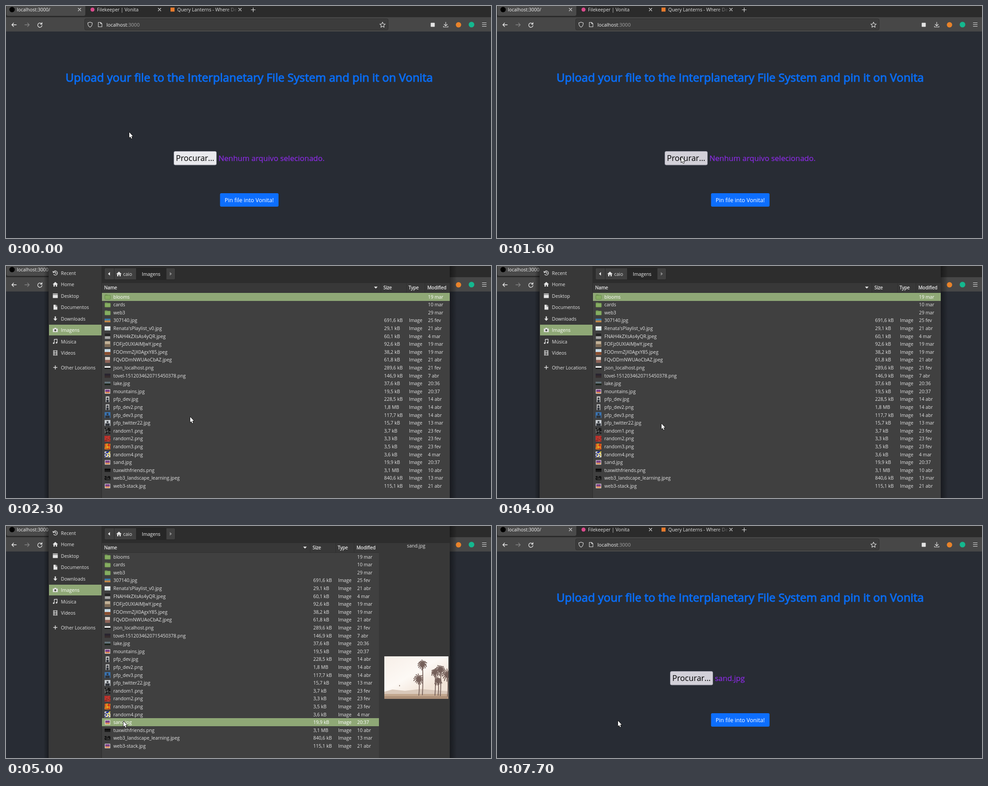
Animation of 1082x518 px, one loop 8000 ms. Source, as an HTML page with a canvas:

```html
<!DOCTYPE html>
<html lang="en">
<head>
<meta charset="utf-8">
<title>File upload</title>
<style>
html, body { margin: 0; width: 100%; height: 100%; overflow: hidden; background: #282c34; }
canvas { display: block; }
</style>
</head>
<body>
<canvas id="stage" width="1082" height="518"></canvas>
<script>
const g = document.getElementById('stage').getContext('2d');
const W = 1082, H = 518, LOOP = 8000;
const FAMILY = '"Open Sans", "Noto Sans", sans-serif';
const GREEN = '#8fa876', INK = '#e4e4e4';

// ---------- helpers ----------
function rect(x, y, w, h, fill) {
  g.fillStyle = fill;
  g.fillRect(x, y, w, h);
}
function box(x, y, w, h, r, fill, edge) {
  g.beginPath();
  g.roundRect(x, y, w, h, r);
  if (fill) { g.fillStyle = fill; g.fill(); }
  if (edge) { g.strokeStyle = edge; g.lineWidth = 1; g.stroke(); }
}
function dot(x, y, r, fill) {
  g.beginPath();
  g.arc(x, y, r, 0, 7);
  g.fillStyle = fill;
  g.fill();
}
function text(s, x, y, size, fill, align = 'left', bold = 0) {
  g.font = size + 'px ' + FAMILY;
  g.textAlign = align;
  g.fillStyle = fill;
  g.fillText(s, x, y);
  if (bold) {
    g.strokeStyle = fill;
    g.lineWidth = bold;
    g.lineJoin = 'round';
    g.strokeText(s, x, y);
  }
}
function path(d, x, y, stroke, width = 1.2, fill) {
  const p = new Path2D(d);
  g.save();
  g.translate(x, y);
  g.lineCap = g.lineJoin = 'round';
  if (fill) { g.fillStyle = fill; g.fill(p); }
  if (stroke) { g.strokeStyle = stroke; g.lineWidth = width; g.stroke(p); }
  g.restore();
}
function random(seed) {
  return () => (seed = (seed * 16807) % 2147483647) / 2147483647;
}

// ---------- browser ----------
const CROSS = 'M-3 -3L3 3M3 -3L-3 3';

function browser() {
  rect(0, 0, W, 26, '#2b2b2b');
  box(1, -8, 176, 30, 4, '#4a4a4a');
  rect(0, 25, W, 32, '#474747');

  dot(13.5, 8, 6, '#000');
  text('localhost:3000/', 24, 12, 10.5, '#f4f4f4');
  dot(193, 8, 4.5, '#d94a8c');
  text('Filekeeper | Vonita', 203, 12, 10.5, INK);
  rect(367, 3.5, 9, 9, '#e87a2c');
  const fade = g.createLinearGradient(490, 0, 517, 0);
  fade.addColorStop(0, INK);
  fade.addColorStop(1, 'rgba(228,228,228,0)');
  g.save();
  g.beginPath();
  g.rect(380, 0, 137, 22);
  g.clip();
  text('Query Lanterns - Where Dev', 382, 12, 10.5, fade);
  g.restore();
  for (const x of [164, 342.5, 522]) path(CROSS, x, 8, INK, 1.1);
  path('M-4.5 0H4.5M0 -4.5V4.5', 551.5, 8.5, INK);

  path('M5 0H-5M-1 -4L-5 0L-1 4', 18, 42, '#f4f4f4', 1.3);
  path('M-5 0H5M1 -4L5 0L1 4', 47, 42, '#858585', 1.3);
  path('M4 -2.5A4.8 4.8 0 1 0 4.8 1M4.8 -5.5V-2H1.3', 75.5, 42.5, '#f4f4f4', 1.3);

  box(175.5, 28.5, 677, 25, 3, '#3c3c3c', '#2e2e2e');
  path('M0 -5.5L5 -3.8C5 1 4 4 0 5.8C-4 4 -5 1 -5 -3.8Z', 187.5, 41.5, INK, 1.1);
  path('M-4 -5H1L4 -2V5H-4ZM1 -5V-2H4', 210, 41.5, INK, 1.1);
  text('localhost', 224, 46, 11, '#f4f4f4');
  text(':3000', 224 + g.measureText('localhost').width, 46, 11, '#a4a4a4');
  path('M0 -6L1.8 -2L6 -1.6L2.8 1.3L3.7 5.5L0 3.3L-3.7 5.5L-2.8 1.3L-6 -1.6L-1.8 -2Z', 840, 42, INK, 1.1);

  box(947.5, 37.5, 9, 9, 1, INK);
  path('M0 -6V2.5M-3.5 -1L0 2.5L3.5 -1M-5 3V5H5V3', 981, 42, INK, 1.2);
  dot(1009.5, 42, 6, '#e8832a');
  dot(1038.5, 41.5, 6.3, '#14b88f');
  path('M-4.5 -4H4.5M-4.5 0H4.5M-4.5 4H4.5', 1067, 41.5, INK, 1.2);
}

// ---------- page ----------
function page(picked, hover) {
  rect(0, 57, W, H - 57, '#282c34');
  text('Upload your file to the Interplanetary File System and pin it on Vonita',
    542.5, 168.5, 25.5, '#0a6cf2', 'center', 1.1);
  const x = picked ? 386 : 374;
  box(x + 0.5, 324.5, 95, 30.5, 3, hover ? '#d2d0d8' : '#e9e9ed', '#8f8f9d');
  text('Procurar…', x + 5, 346, 17.8, '#000');
  text(picked ? 'sand.jpg' : 'Nenhum arquivo selecionado.', x + 100, 346, 16.95, '#8a2be2', 'left', 0.25);
  box(477.5, 418, 130.5, 30, 3, '#0d6efd');
  text('Pin file into Vonita!', 542.5, 437.5, 12.6, '#fff', 'center');
}
function tooltip() {
  box(410.5, 354.5, 157, 28, 2, '#fbeaa0', '#8a8262');
  text('Nenhum arquivo selecionado.', 489, 372.5, 10.4, '#303030', 'center');
}

// ---------- file dialog ----------
const PLACES = ['Recent', 'Home', 'Desktop', 'Documentos', 'Downloads', 'Imagens', 'Música', 'Vídeos'];
const FILES = `blooms||19 mar
cards||10 mar
web3||29 mar
307140.jpg|691,6 kB|25 fev
Renata'sPlaylist_v0.jpg|29,1 kB|21 abr
FNAH4kZXsAs4yQR.jpeg|60,1 kB|4 mar
FOFjz0UXIAIMJwY.jpeg|92,6 kB|19 mar
FOOmmZjX0AgxY85.jpeg|38,2 kB|19 mar
FQvDDmNWUAoCbAZ.jpeg|61,8 kB|21 abr
json_localhost.png|289,6 kB|21 fev
tovel-1512034620715450378.png|146,9 kB|7 abr
lake.jpg|37,6 kB|20:36
mountains.jpg|19,5 kB|20:37
pfp_dev.jpg|228,5 kB|14 abr
pfp_dev2.png|1,8 MB|14 abr
pfp_dev3.png|117,7 kB|14 abr
pfp_twitter22.jpg|15,7 kB|13 mar
random1.png|3,7 kB|23 fev
random2.png|3,3 kB|23 fev
random3.png|3,5 kB|23 fev
random4.png|3,6 kB|4 mar
sand.jpg|19,9 kB|20:37
tuxwithfriends.png|3,1 MB|10 abr
web3_landscape_learning.jpeg|840,6 kB|13 mar
web3-stack.jpg|115,1 kB|21 abr`.split('\n').map(line => line.split('|'));
const SAND = 21;

// per row: width, height, upper and lower colour
const PICTURES = {
  3: [13, 8, '#3d7fae', '#c98a45'], 4: [13, 9, '#eef3f2', '#cfe0e0'],
  5: [12, 12, '#242424', '#a8a8a8'], 6: [12, 13, '#c3b297', '#7d6a55'],
  7: [13, 13, '#c9dbe6', '#8a4f30'], 8: [11, 13, '#d8cfc8', '#8f6458'],
  9: [13, 7, '#f0f0f0', '#151515'], 10: [13, 9, '#292430', '#352b2c'],
  11: [13, 8, '#66777e', '#1d241c'], 22: [13, 7, '#0c0c0c', '#1b1b1b']
};
const PORTRAITS = { 13: [8, '#c9c9c9'], 14: [8, '#bdbdbd'], 15: [13, '#3a73b0'], 16: [13, '#c8ccd0'] };
const NOISE = {
  17: ['#111', '#222', '#666'], 18: ['#d8302c', '#8f2420', '#b84a3a'],
  19: ['#e02a18', '#f6c21c', '#e8801c'], 20: ['#f4f4f4', '#2a3aa8', '#f0d83c'],
  23: ['#0c0c0c', '#141414', '#333']
};

function folder(y) {
  box(220.5, y - 5, 6, 4, 1, '#6f9150');
  box(220.5, y - 3.5, 12.5, 9, 1, '#86ad62', '#66874a');
}
function thumb(i, y) {
  const cx = 226.5;
  if (i < 3) return folder(y);
  if (PICTURES[i]) {
    const [w, h, top, low] = PICTURES[i];
    rect(cx - w / 2, y - h / 2, w, h, top);
    rect(cx - w / 2, y, w, h / 2, low);
  } else if (PORTRAITS[i]) {
    const [w, back] = PORTRAITS[i];
    rect(cx - w / 2, y - 6.5, w, 13, back);
    dot(cx, y - 2, 2.2, '#30343a');
    rect(cx - w / 2 + 1.5, y + 1, w - 3, 5.5, '#30343a');
  } else if (NOISE[i]) {
    const next = random(i * 977), h = i === 23 ? 9 : 13;
    for (let a = 0; a < 13; a += 2)
      for (let b = 0; b < h; b += 2)
        rect(220 + a, y - h / 2 + b, Math.min(2, 13 - a), Math.min(2, h - b), NOISE[i][Math.floor(next() * 3)]);
  } else {
    rect(220.5, y - 5, 12, 10, '#f0eeee');
    rect(221.5, y - 4, 10, 5, '#7a3f86');
    rect(221.5, y + 1, 10, 3, '#d9824a');
  }
}

const HOUSE = 'M0 -5.5L6 0H4V5H1.3V1.5H-1.3V5H-4V0H-6Z';

function placeIcon(i, y) {
  const x = 110;
  const solid = d => path(d, x, y, null, 0, INK);
  const line = (d, w = 1.3) => path(d, x, y, INK, w);
  switch (i) {
    case 0: return line('M-4.5 -1A4.7 4.7 0 1 1 -3.5 3.3M-5.5 -3.5L-4.5 -0.5L-1.8 -1.8M0 -2.5V0.5H2.3');
    case 1: return solid(HOUSE);
    case 2: return solid('M-5.5 -5H5.5V-3.2H-5.5ZM-5.5 -2.3H5.5V5H-5.5Z');
    case 3: return solid('M-4 -5.5H1V-1.5H4.5V5.5H-4ZM2 -5.5L4.5 -2.5H2Z');
    case 4: return solid('M-1.3 -5H1.3V0H4.5L0 5L-4.5 0H-1.3Z');
    case 5:
      solid('M-5.5 -3.2H-2.5L-1.5 -5H1.5L2.5 -3.2H5.5V4.5H-5.5Z');
      return dot(x, y + 0.5, 2.2, '#484b44');
    case 6:
      line('M-2.3 3.5V-4.5L4 -5.2V2.5');
      dot(x - 3.6, y + 3.7, 1.7, INK);
      return dot(x + 2.7, y + 2.7, 1.7, INK);
    case 7: return line('M-4 -5.5V5.5M4 -5.5V5.5M-2 -5V5M2 -5V5M-4 -5H4M-4 0H4M-4 5H4', 1.1);
  }
}

function sidebar(ready) {
  rect(95, 0, 118, H, '#383838');
  rect(213, 0, 1, H, '#2c2c2c');
  if (ready) rect(96, 131, 117, 24, GREEN);
  PLACES.forEach((name, i) => {
    const y = 15.5 + i * 25.5;
    placeIcon(i, y);
    text(name, 122.5, y + 4, 10.5, i === 5 ? '#fff' : INK);
  });
  path('M-4 0H4M0 -4V4', 110, 226.5, INK, 1.5);
  text('Other Locations', 122.5, 230.5, 10.4, INK);
}

function crumbs(ready) {
  rect(214, 0, 776, 38, '#2d2d2d');
  box(219.5, 4.5, 158, 26, 3, '#404040', '#262626');
  rect(290, 5, 67, 25, '#272727');
  for (const x of [241, 290, 357]) rect(x, 5, 1, 25, '#2a2a2a');
  path('M2 -4V4L-2.5 0Z', 230, 17.5, null, 0, INK);
  path('M-2 -4V4L2.5 0Z', 367.5, 17.5, null, 0, ready ? '#8a8a8a' : INK);
  path(HOUSE, 252, 18, null, 0, INK);
  text('caio', 261.5, 21.5, 10.5, INK);
  text('Imagens', 303, 21.5, 10.5, '#f4f4f4');
}

function fileList(ready, picked) {
  const right = picked ? 832 : 990, shift = right - 990;
  const selected = picked ? SAND : 0;
  rect(214, 38, right - 214, 22, '#383838');
  rect(214, 59, right - 214, 1, '#303030');
  rect(214, 60, right - 214, H - 60, '#404040');
  for (const x of [836, 893, 934]) rect(x + shift, 38, 1, 21, '#2e2e2e');
  text('Name', 219, 52, 10.3, INK, 'left', 0.35);
  text('Size', 842 + shift, 52, 10.3, INK, 'left', 0.35);
  text('Type', 898 + shift, 52, 10.3, INK, 'left', 0.35);
  text('Modified', 940 + shift, 52, 10.3, INK, 'left', 0.35);
  path('M-4 -2H4L0 2.5Z', 825 + shift, 48, null, 0, INK);

  FILES.forEach(([name, size, date], i) => {
    const y = 68.8 + i * 17.6, on = i === selected;
    if (on) rect(214, Math.round(y - 9), right - 214, 18, GREEN);
    const ink = on ? '#fff' : INK;
    if (ready || i === 0) thumb(i, y);
    text(name, 239.5, y + 3.8, 10.45, ink);
    if (size) {
      text(size, 843.5 + shift, y + 3.8, 10.5, ink);
      text('Image', 899 + shift, y + 3.8, 10.4, ink);
    }
    text(date, 941.5 + shift, y + 3.8, 10.3, ink);
  });
}

function palm(x, y, r, foot, seed) {
  const next = random(seed), ink = '#75605a';
  path(`M0 0Q2 ${(foot - y) / 2} 0 ${foot - y}`, x, y, ink, 1.8);
  for (let i = 0; i < 15; i++) {
    const a = i / 15 * Math.PI * 2, len = r * (0.75 + next() * 0.35);
    const dx = Math.cos(a) * len, dy = Math.sin(a) * len;
    path(`M0 0Q${dx * 0.6} ${dy * 0.6 - 3} ${dx} ${dy + 2}`, x, y, ink, 1.8);
  }
  dot(x, y + 2, r * 0.48, ink);
}
function preview() {
  rect(832, 38, 158, H - 38, '#383838');
  text('sand.jpg', 915, 47.5, 10.4, INK, 'center');
  g.save();
  g.beginPath();
  g.rect(844, 291, 143, 95);
  g.clip();
  const sky = g.createLinearGradient(844, 291, 900, 386);
  sky.addColorStop(0, '#f7efe8');
  sky.addColorStop(0.6, '#fdf9f5');
  sky.addColorStop(1, '#f2e4d8');
  rect(844, 291, 143, 95, sky);
  path('M844 370L862 365L890 368L925 364L987 369V386H844Z', 0, 0, null, 0, '#d9c8ba');
  rect(844, 375, 143, 11, '#c2a78f');
  rect(844, 380, 143, 6, '#ad9079');
  palm(929, 308, 11, 377, 11);
  palm(921, 341, 12, 378, 23);
  palm(957, 326, 9, 378, 37);
  palm(969, 320, 12, 379, 41);
  palm(964, 345, 9, 378, 59);
  palm(985, 331, 13, 380, 73);
  rect(877, 355, 2, 3, '#a4948a');
  g.restore();
}

function shade(from, to) {
  const fade = g.createLinearGradient(from, 0, to, 0);
  fade.addColorStop(0, 'rgba(0,0,0,0.4)');
  fade.addColorStop(1, 'rgba(0,0,0,0)');
  rect(Math.min(from, to), 0, Math.abs(to - from), H, fade);
}
function dialog(ready, picked) {
  shade(95, 84);
  shade(990, 1006);
  sidebar(ready);
  crumbs(ready);
  fileList(ready, picked);
  if (picked) preview();
}

// ---------- pointer ----------
const STOPS = [[4000, 366, 351], [4300, 287, 410], [4600, 264, 430], [4800, 261, 435], [5500, 269, 434]];
const ARROW = 'M1 1V13L3.6 10.6L5.5 15L7.4 14.2L5.5 9.8H9.2Z';

function pointerAt(t) {
  const k = t < 400 ? 0 : Math.min(6, Math.floor((t - 400) / 100) + 1) / 6;
  const ease = k * k * (3 - 2 * k);
  let at = [274 + 136 * ease, 281 + 55 * ease];
  for (const [time, x, y] of STOPS) if (t >= time) at = [x, y];
  return at;
}
function pointer(x, y) {
  path(ARROW, x, y, '#111', 1.8);
  path(ARROW, x, y, null, 0, '#fff');
}

// ---------- loop ----------
function draw(t) {
  const [x, y] = pointerAt(t);
  const done = t >= 7700, open = t >= 2100 && !done;
  const over = x >= 374 && x <= 470 && y >= 324 && y <= 355;
  browser();
  page(done, over || done);
  if (t >= 1400 && t < 1600) tooltip();
  if (open) dialog(t >= 2300, t >= 5000);
  pointer(x, y);
}

const start = performance.now();
function tick() {
  draw((performance.now() - start) % LOOP);
  requestAnimationFrame(tick);
}
tick();
</script>
</body>
</html>
```
